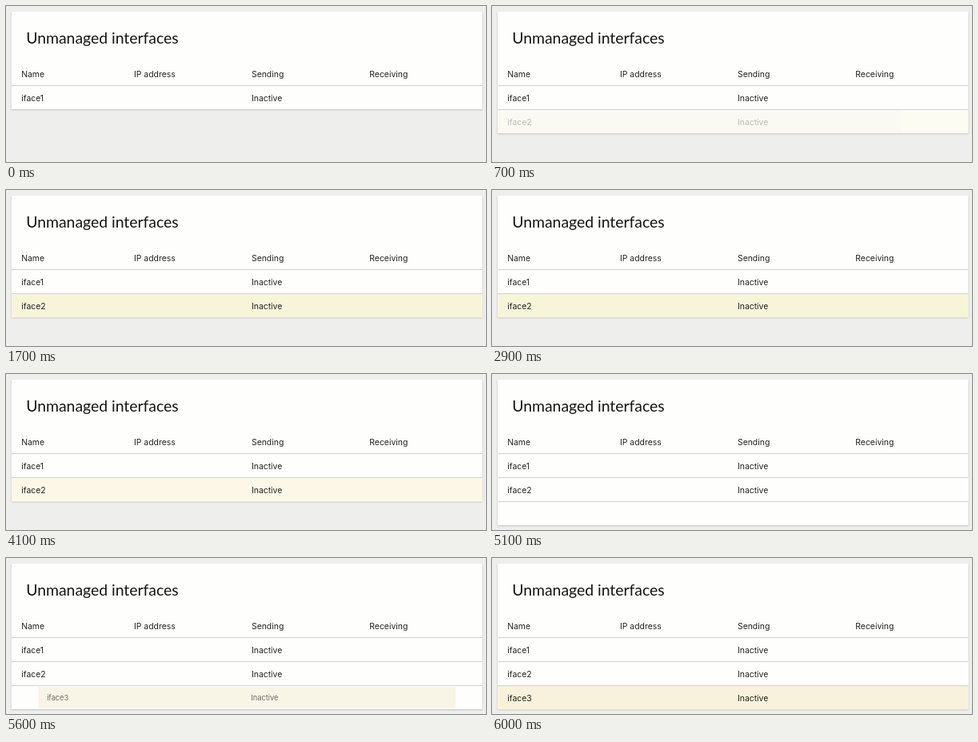
An HTML page for the animation above (8000 ms loop, 600 px wide and 195 px high).

```html
<!DOCTYPE html>
<html lang="en">
<head>
<meta charset="utf-8">
<title>Unmanaged interfaces</title>
<style>
  html, body { margin: 0; width: 100%; height: 100%; overflow: hidden; background: #eeeeed; }
  svg { display: block; width: 600px; height: 195px; }
  text { font: 10.4px Inter, sans-serif; fill: #222; }
  .head { font-weight: 600; }
  .title { font: 19.4px Lato, sans-serif; fill: #151515; }
  .card { fill: #fefefd; filter: drop-shadow(0 1px 1px rgba(0, 0, 0, .2)); }
  .line { fill: #d2d2d0; }
  .row { transform-origin: 301px 174.5px; }
</style>
</head>
<body>
<svg viewBox="0 0 600 195">
  <rect class="card" id="card" x="7" y="7" width="588.5" height="122"/>
  <text class="title" x="25.2" y="47.3">Unmanaged interfaces</text>
  <g class="head">
    <text x="19.2" y="89">Name</text>
    <text x="160" y="89">IP address</text>
    <text x="307" y="89">Sending</text>
    <text x="454.3" y="89">Receiving</text>
  </g>
  <text x="19.2" y="118.6">iface1</text>
  <text x="307" y="118.6">Inactive</text>
  <g id="row2">
    <rect id="tint" x="7" y="129" width="588.5" height="30.5"/>
    <text x="19.2" y="148.6">iface2</text>
    <text x="307" y="148.6">Inactive</text>
  </g>
  <g id="row3" class="row">
    <rect x="7" y="159.5" width="588.5" height="30" fill="#f8f2dc"/>
    <text x="19.2" y="178.6">iface3</text>
    <text x="307" y="178.6">Inactive</text>
  </g>
  <rect class="line" x="7" y="99" width="588.5" height="1"/>
  <rect class="line" id="line2" x="7" y="129" width="588.5" height="1"/>
  <rect class="line" id="line3" x="7" y="159" width="588.5" height="1"/>
</svg>
<script>
const LOOP = 8000, STEP = 100;
const [card, row2, tint, row3, line2, line3] =
  ['card', 'row2', 'tint', 'row3', 'line2', 'line3'].map(id => document.getElementById(id));

const yellow = [247, 244, 218], cream = [252, 247, 230], white = [254, 254, 253];
const progress = (t, from, to) => Math.min(1, Math.max(0, (t - from) / (to - from)));
const mix = (a, b, p) => `rgb(${a.map((v, i) => v + (b[i] - v) * p)})`;

function draw(t) {
  // The card grows at once, then the new row fades in.
  const rows = t < 500 ? 1 : t < 5100 ? 2 : 3;
  card.setAttribute('height', [122, 152, 182][rows - 1]);
  line2.style.opacity = rows > 1 ? 1 : 0;
  line3.style.opacity = rows > 2 ? 1 : 0;

  row2.style.opacity = 1 - (1 - progress(t, 600, 1200)) ** 2;
  tint.style.fill = t < 4100
    ? mix(yellow, cream, progress(t, 3500, 4100))
    : mix(cream, white, progress(t, 4100, 4600));

  const p = progress(t, 5200, 5800);
  row3.style.opacity = p;
  row3.style.transform = `scale(${0.66 + 0.34 * p})`;
}

function tick(now) {
  draw(Math.floor(now % LOOP / STEP) * STEP);
  requestAnimationFrame(tick);
}
draw(0);
requestAnimationFrame(tick);
</script>
</body>
</html>
```
